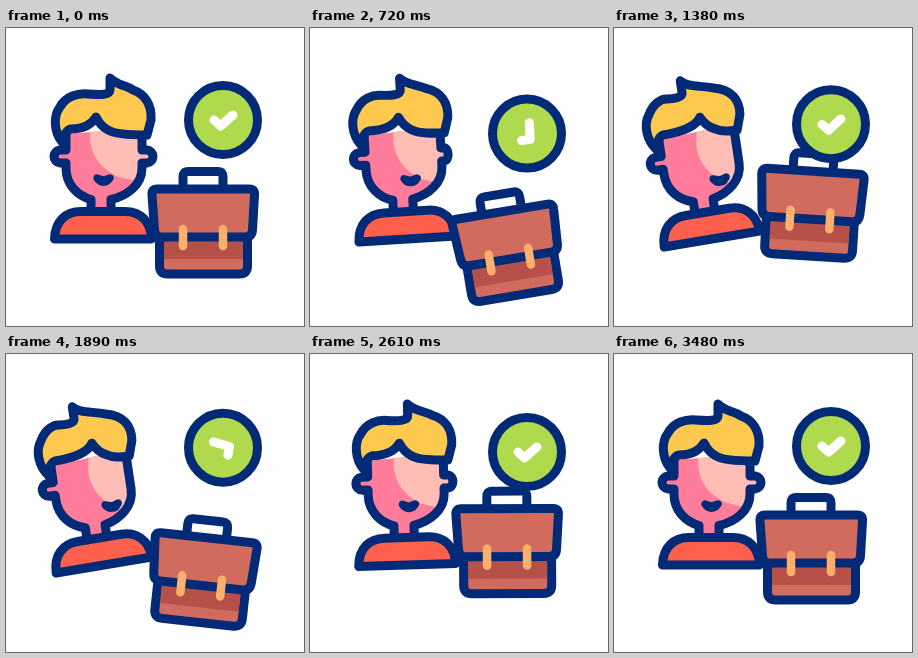
Animation, 298 px wide and 298 px high, one loop 3.6 s. Source, as an HTML page:

```html
<!DOCTYPE html>
<html lang="en">
<head>
<meta charset="utf-8">
<title>Approved candidate</title>
<style>
html, body { margin: 0; width: 100%; height: 100%; overflow: hidden; background: #fff; }
svg { display: block; width: 100vw; height: 100vh; }
.line { stroke: #022a77; stroke-width: 9; stroke-linecap: round; stroke-linejoin: round; }
</style>
</head>
<body>
<svg viewBox="0 0 298 298">
  <defs>
    <clipPath id="faceClip"><path id="faceEdge"/></clipPath>
  </defs>

  <g id="head">
    <path id="skin" fill="#ff7d9a"/>
    <g clip-path="url(#faceClip)">
      <path id="light" fill="#ffbdb6" d="M84 70V108C84 126 94 141 113 149L135 154H180V70Z"/>
    </g>
    <path id="faceLine" class="line" fill="none"/>
    <path id="mouth" class="line" fill="#022a77" style="stroke-width:7.500" d="M91 150C94 155.500 101 155.500 104 150Q99 151.500 97.500 152.500Q96 151.500 91 150Z"/>
    <path id="hair" class="line" fill="#ffc950"/>
  </g>
  <path id="body" class="line" fill="#ff5f4d" d="M48.500 211C49 193 60 183.500 75 183.500H119C134 183.500 145 193 145.500 211Z"/>

  <g id="bag">
    <path class="line" fill="none" d="M177 161V149Q177 143.500 182 143.500H212Q217 143.500 217 149V161"/>
    <path class="line" fill="#d16b5d" d="M153.500 209V238Q153.500 246 161.500 246H233.500Q241.500 246 241.500 238V209"/>
    <path fill="#b55148" d="M158 209H237V231H158Z"/>
    <path class="line" fill="#d16b5d" d="M151 161H243.500Q249 161 248.500 167L246.500 202Q246 209 239 209H156Q149 209 148.500 202L146 167Q145.500 161 151 161Z"/>
    <path fill="none" stroke="#fbb06c" stroke-width="8.500" stroke-linecap="round" d="M177 201V218M217 201V218"/>
  </g>

  <g id="badge">
    <circle class="line" cx="217" cy="92" r="34.500" fill="#b0da4e"/>
    <path id="check" fill="none" stroke="#fff" stroke-width="9" stroke-linecap="round" stroke-linejoin="round" d="M208 92L214.500 98L227 87"/>
  </g>
</svg>

<script>
const LOOP = 3600, STEP = 30, END = 3480;
const el = id => document.getElementById(id);
const move = (id, value) => el(id).setAttribute("transform", value);
const shape = (id, d) => el(id).setAttribute("d", d);

const progress = (t, from, to) => Math.min(1, Math.max(0, (t - from) / (to - from)));

function smooth(t, from, to) {
  const u = progress(t, from, to);
  return u * u * (3 - 2 * u);
}

// One soft swing out to 1 and back to 0.
const swing = (t, from, to) => Math.sin(Math.PI * progress(t, from, to)) ** 2;

// A full turn to the left that overshoots, then settles.
const spin = (t, from, to) => 20 * smooth(t, to + 60, to + 300) - 380 * smooth(t, from, to);

// Face, ears and neck in one outline; the right ear slips behind the cheek.
function facePath(turn) {
  const near = 141 - 5 * turn, far = 149 - 13 * turn;
  return `M60 106V122H54C46 123 46 134 54 135H60V140C60 157 72 168 85 171.500V186
    H105V171.500C121 168 136 157 136 140V135H${near}C${far} 134 ${far} 123 ${near} 122H136V100`;
}

// The tuft slides back while the fringe slides forward.
function hairPath(turn) {
  const back = x => x - 14 * turn;
  const front = x => x + 14 * turn;
  return `M56 114C48 104 47 88 54 79C60 68 ${72 - 3 * turn} 65 ${82 - 8 * turn} 66
    C${back(94)} 67 ${back(104)} 67 ${back(104)} 62L${back(104)} 50
    C${back(110)} 57 ${back(120)} 57 ${127 - 5 * turn} 62
    C139 66 146 77 ${145 - turn} 92L${141 - 2 * turn} 107
    C130 107 ${front(110)} 107 ${front(102)} 102C${front(96)} 99 ${front(93)} 95 ${front(90)} 89
    C${front(84)} 99 ${73 + 5 * turn} 101 65 101C60 102 58 108 56 114Z`;
}

function draw(t) {
  const turn = smooth(t, 300, 1300) - smooth(t, 1950, 2850);
  const face = facePath(turn);
  for (const id of ["skin", "faceEdge", "faceLine"]) shape(id, face);
  shape("hair", hairPath(turn));
  move("head", `rotate(${-8.5 * turn} 97 211)`);
  move("light", `translate(${18 * turn} 0) rotate(${14 * turn} 83 90)`);
  move("mouth", `translate(${17 * turn} ${2 * turn})`);
  move("body", `translate(${turn} 0) rotate(${-9.5 * turn} 97 211)`);

  const bagY = 27 * swing(t, 360, 1360) - 18 * swing(t, 1160, 1620)
    + 22.5 * swing(t, 1500, 2300) - 12 * swing(t, 2240, 2740) + 7 * swing(t, 2660, END);
  const tilt = -10 * swing(t, 280, 1320) + 9 * swing(t, 1140, 2230)
    - 9.5 * swing(t, 2060, 2640) + 3 * swing(t, 2620, END);
  move("bag", `translate(${-0.2 * tilt} ${bagY}) rotate(${tilt} 197 204)`);

  const badgeY = 15 * swing(t, 300, 1000) - 17 * swing(t, 870, 1330)
    + 12 * swing(t, 1230, 1980) - 10 * swing(t, 1920, 2400) + 6 * swing(t, 2400, 2850);
  move("badge", `translate(0 ${badgeY})`);
  move("check", `rotate(${spin(t, 600, 1120) + spin(t, 1700, 2200)} 217 92)`);
}

const start = performance.now();
function tick() {
  const t = (performance.now() - start) % LOOP;
  draw(Math.min(END, Math.floor(t / STEP) * STEP));
  requestAnimationFrame(tick);
}
tick();
</script>
</body>
</html>
```
